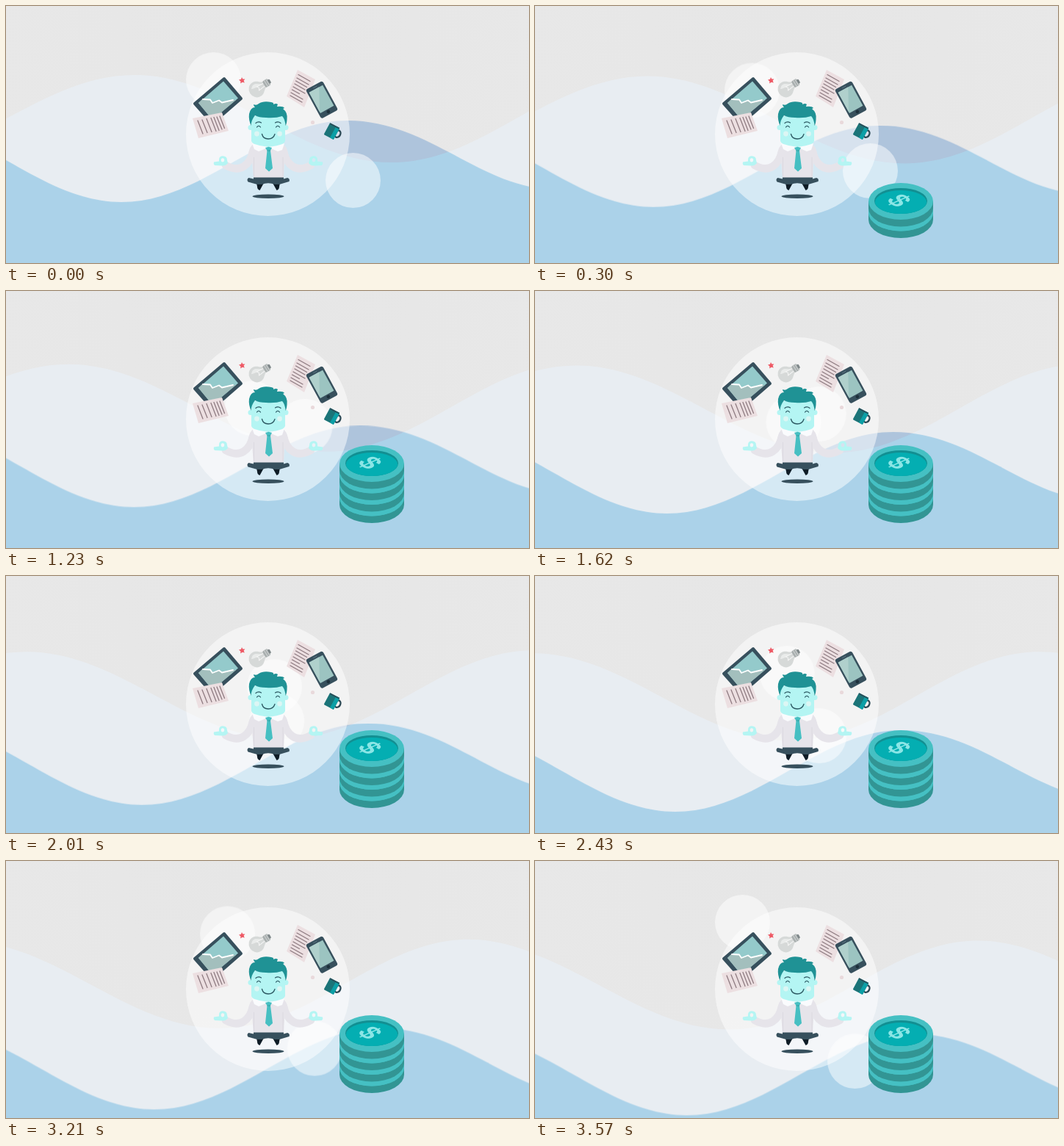
Recreate the animation shown at these times as an HTML page. Size 712 by 350 pixels, loop 3600 ms.

```html
<!DOCTYPE html>
<html lang="en">
<head>
<meta charset="utf-8">
<title>Calm balance</title>
<style>
html, body { margin: 0; width: 100%; height: 100%; overflow: hidden; background: #e7e7e7; }
svg { display: block; width: 712px; height: 350px; }

.move { animation: move 3600ms linear infinite; }
.pale { --x: -263px; --y: 16.6px; }
.blue { --x: 50px; --y: 80px; }
.sink { --x: 154.3px; --y: 173.4px; }
.rise { --x: -191.6px; --y: -155.3px; }
@keyframes move { to { transform: translate(var(--x), var(--y)); } }

.coin { animation: 3600ms step-end infinite; }
.c1 { animation-name: c1; }
.c2 { animation-name: c2; }
.c3 { animation-name: c3; }
.c4 { animation-name: c4; }
@keyframes c1 { 0% { opacity: 0; } 0.83%, 100% { opacity: 1; } }
@keyframes c2 { 0% { opacity: 0; } 7.5%, 100% { opacity: 1; } }
@keyframes c3 { 0% { opacity: 0; } 14.16%, 100% { opacity: 1; } }
@keyframes c4 { 0% { opacity: 0; } 20.83%, 100% { opacity: 1; } }

.line { fill: none; stroke-linecap: round; stroke-linejoin: round; }
.dollar { font: bold 43px "Liberation Sans", Arial, sans-serif; text-anchor: middle; }
</style>
</head>
<body>
<svg viewBox="0 0 712 350">
  <defs>
    <radialGradient id="sky" gradientUnits="userSpaceOnUse" cx="356" cy="20" r="400">
      <stop offset="0" stop-color="#e6e6e6"/>
      <stop offset="1" stop-color="#e8e8e8"/>
    </radialGradient>
    <path id="blueWave" d="M-151 156C-39 156 45 267 157 267S353 156 465 156S646 250 750 250V420H-151Z"/>
    <clipPath id="inPale">
      <path class="move pale" d="M-175 213C-47.5 213 47.5 94 175 94S397.5 213 525 213S740.5 92 864 92S1087 213 1214 213V420H-175Z"/>
    </clipPath>

    <path id="spacer" d="M-44 9V15.5A44 25 0 0 0 44 15.5V9Z" fill="#45c0c3"/>
    <g id="coin">
      <path d="M-44 0V9.5A44 25 0 0 0 44 9.5V0Z" fill="#329594"/>
      <ellipse rx="44" ry="25" fill="#45c0c3"/>
      <ellipse cy="-.5" rx="36" ry="17.6" fill="#128f92"/>
      <ellipse cy="1" rx="35.2" ry="16" fill="#04aeb2"/>
      <g transform="translate(-2 -1.5) scale(1 .56) rotate(52)">
        <text class="dollar" y="15" fill="#8be6e6">$</text>
      </g>
    </g>

    <!-- one half of the mirrored figure -->
    <g id="side">
      <path class="line" d="M337 196C332 217 319 228 299 217" stroke="#e6e4ea" stroke-width="10.5"/>
      <path d="M338 187Q331 190 329 206L340 214Z" fill="#e6e4ea"/>
      <path d="M283 212.5L290 211.5Q289 204.5 295 204.3Q301 204.5 301 210L302 214Q299 218 294 217.5L284 217Q282 215 283 212.5Z
        M295 207.2A2.3 2.6 0 1 0 295 212.4A2.3 2.6 0 1 0 295 207.2Z" fill="#b4f5f3" fill-rule="evenodd"/>
      <path d="M341 241L351 241L345.500 251Q342 250 342 246Z" fill="#0f1c26"/>
    </g>
    <g id="cheek">
      <circle cx="333" cy="165.500" r="3.500" fill="#b4f5f3"/>
      <circle cx="341.500" cy="174" r="3.400" fill="#dcf6f4"/>
      <path class="line" d="M340 159.500Q343.500 156.500 347.500 159M341.500 165Q344 161.500 346.500 165" stroke="#2a5660" stroke-width="1.200"/>
    </g>
  </defs>

  <rect width="712" height="350" fill="url(#sky)"/>
  <use href="#blueWave" class="move blue" fill="#aec4dc"/>
  <g clip-path="url(#inPale)">
    <rect width="712" height="350" fill="#e8edf2"/>
    <use href="#blueWave" class="move blue" fill="#abd2e9"/>
  </g>

  <g fill="#fff" fill-opacity=".5">
    <circle cx="356.500" cy="174.500" r="111.500"/>
    <circle class="move sink" cx="282.500" cy="100.500" r="37.500"/>
    <circle class="move rise" cx="472.500" cy="237.500" r="37.500"/>
  </g>

  <!-- tablet -->
  <path class="line" d="M257 133L297 99L320 126L281 160Z" style="fill:#37505d" stroke="#37505d" stroke-width="4"/>
  <path d="M262 132L296 102.500L316 125.500L281 155Z" fill="#94cacb"/>
  <path d="M267 127L278 128L281 132L290 128.500L294 131.500L309 128L313 128L281 155L262 132Z" fill="#a3bfbd"/>
  <path class="line" d="M268 127L278 127.500L281 132L290 128.500L294 131.500L309 128" stroke="#fff" stroke-width="1.800"/>

  <!-- papers -->
  <path d="M254 153L294 145L303 170L262 180Z" fill="#ecdfe1"/>
  <path class="line" d="M261 156l7 18M267 155l7 17.500M273 153.500l7 18M279 152.500l7 18M283 151.500l7 18M287 151l7 17M291 150l6.500 16.500" stroke="#8f7c82" stroke-width="1.300"/>
  <path d="M397 87L421 100L406 138L382 123Z" fill="#ecdfe1"/>
  <path class="line" d="M398 93.500l16 9M396 98l16 9M394.500 102l15 8.500M393 106l14 8M391 110l16 9M389.500 114l10 5.500M388 118l16 9M387 122l16 9" stroke="#8f7c82" stroke-width="1.300"/>

  <path d="M321 97l1.400 2.600 3-.2-1.800 2.400 1.200 2.800-3-.8-2.600 1.800.2-3.200-2.400-1.800 3-.8Z" fill="#ee5965"/>
  <circle cx="417.500" cy="158.500" r="2.600" fill="#e9d9db"/>

  <!-- bulb -->
  <g transform="translate(342 113) rotate(58)">
    <path d="M-4.500 -12C-4.500 -8 -11 -6 -11 1A11 10.500 0 0 0 11 1C11 -6 4.500 -8 4.500 -12Z" fill="#d6d9d8"/>
    <path d="M-7 -2Q-9 3 -4 7Q-2 2 -2 -9Z" fill="#e9ebea"/>
    <path class="line" d="M-2 -11L-3 -1L0 -3L3 -1L2 -11" stroke="#f4f4f4" stroke-width="1"/>
    <rect x="-5" y="-19" width="10" height="8" rx="2" fill="#a9afaf"/>
    <path d="M-5 -14H5M-5 -17H5" stroke="#cfd3d3"/>
    <rect x="-3" y="-21" width="6" height="3" rx="1.500" fill="#7f888a"/>
  </g>

  <!-- phone -->
  <g transform="translate(430 127.700) rotate(-28.500)">
    <rect x="-13" y="-22.500" width="26" height="45" rx="3" fill="#37505d"/>
    <rect x="-10.500" y="-17" width="21" height="32" fill="#9cc4c1"/>
    <path d="M-10.500 -17H5L-10.500 13Z" fill="#b0d0cc"/>
    <circle cy="18.500" r="2.300" fill="#1d303b"/>
    <path d="M-3 -19.700H3" stroke="#5d7480"/>
  </g>

  <!-- mug -->
  <g transform="translate(443.500 170.500) rotate(28)">
    <ellipse cx="8.500" cy="-.5" rx="4" ry="5" fill="none" stroke="#2c4955" stroke-width="2.400"/>
    <rect x="-7.500" y="-9" width="15" height="18" rx="1" fill="#1b7478"/>
    <rect x="2" y="-9" width="5.500" height="18" rx="1" fill="#0c9fa6"/>
    <path d="M-7 -8H7" stroke="#2c4955" stroke-width="1.500"/>
  </g>

  <!-- figure -->
  <ellipse cx="357" cy="259.200" rx="21.500" ry="2.800" fill="#37505d"/>
  <use href="#side"/>
  <use href="#side" transform="translate(714) scale(-1 1)"/>
  <path d="M338 187H376Q380 190 380 200L378 234H337L334 200Q334 190 338 187Z" fill="#e6e4ea"/>
  <path d="M337.500 206V232M377 206V232" stroke="#d8d5de" stroke-width=".8"/>
  <path d="M337 233.500H378V235.500L383 234Q387 235 385.500 239L372 243H366Q357 239.500 348 243H342L329.500 239.500Q327 236 330.500 234L337 235.500Z" fill="#37505d"/>
  <path d="M334 150H380V184Q376 192 357 192Q338 192 334 184Z" fill="#b4f5f3"/>
  <path d="M335 187Q346 191 357 192Q369 191 379 187L376 196L370 198L357.500 192.500L344 198L338 195Z" fill="#fafbfd"/>
  <path d="M353 193L357.500 191.800L362 193L360 197L363 221L358 225.500L353 221L355.500 197Z" fill="#46bfc2"/>
  <path d="M355.500 197H360" stroke="#319ea1"/>
  <use href="#cheek"/>
  <use href="#cheek" transform="translate(714) scale(-1 1)"/>
  <path class="line" d="M348.500 174.500Q350 181 357 181Q364 181 366 174.500" stroke="#2a5660" stroke-width="1.300"/>
  <path d="M333.500 163Q330 154 331 147Q333 138 339 138Q337 136 337 134Q341 136 344 133Q350 129 361 131Q365 131.500 364 134Q368 132 370 134Q369 136 369 137Q377 136 379 139L377 140Q384 145 382.500 155Q382 161 380.500 163Q380 154 376 150Q367 153 354 152Q344 152 339 149Q334 155 333.500 163Z" fill="#1f9295"/>

  <!-- coins -->
  <g transform="translate(498 281.500)" class="stack">
    <g class="coin c1"><use href="#coin"/></g>
    <g class="coin c2"><use href="#spacer" y="-15.500"/><use href="#coin" y="-15.500"/></g>
    <g class="coin c3"><use href="#spacer" y="-31"/><use href="#coin" y="-31"/></g>
    <g class="coin c4"><use href="#spacer" y="-46.500"/><use href="#coin" y="-46.500"/></g>
  </g>
</svg>
</body>
</html>
```
